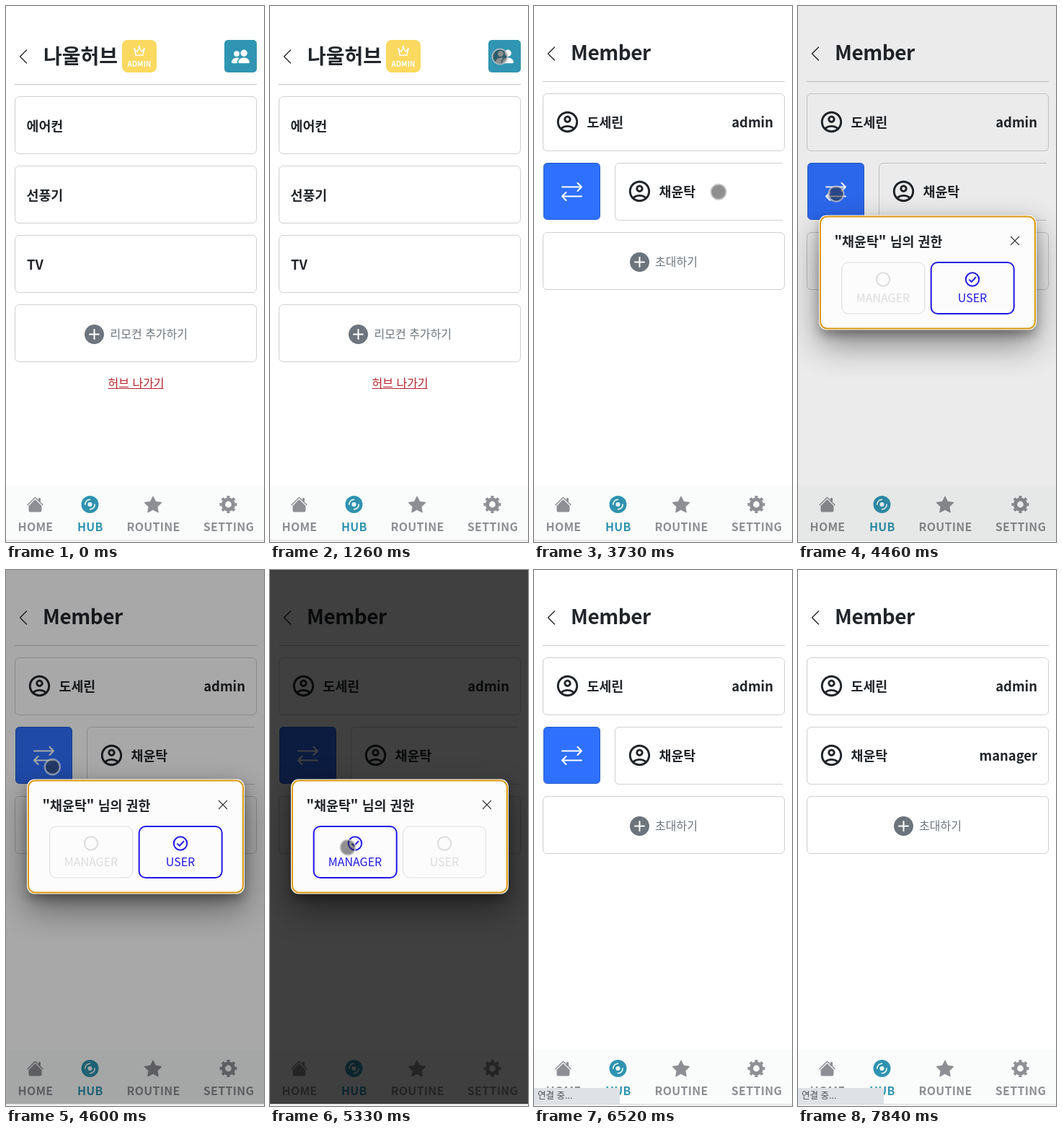
Recreate the animation shown at these times as an HTML page. Size 358 by 742 pixels, loop 8 s.

```html
<!DOCTYPE html>
<html lang="ko">
<head>
<meta charset="utf-8">
<title>Hub members</title>
<style>
  html, body { margin: 0; width: 100%; height: 100%; overflow: hidden; background: #fff; }
  svg { display: block; width: 100vw; height: 100vh; }
  text { font: 16px "Noto Sans CJK KR", "Noto Sans KR", "Noto Sans CJK JP", sans-serif; fill: currentColor; }
  svg { color: #212529; }
  .title { font-size: 28px; font-weight: 700; }
  .latin { letter-spacing: -.5px; }
  .name { font-size: 18.4px; font-weight: 700; }
  .end { text-anchor: end; }
  .mid { text-anchor: middle; }
  .muted { color: #6c757d; }
  .line { fill: none; stroke: currentColor; }
  .card { fill: #fff; stroke: #d0d0d0; }
  .rule { stroke: #c8c8c8; }
  .nav { color: #8e8f94; }
  .nav text { font-weight: 700; letter-spacing: .25px; }
  .nav .active { color: #2f93b0; }
  .on { color: #2018e4; stroke-width: 2; }
  .off { color: #dcdcdc; stroke-width: 1; }
  .wide { filter: blur(24px); }
  .tight { filter: blur(8px); }

  /* switches: hard on/off over one 8 s loop */
  .hub, .members, .status, .slid, .user, .manager, .modal, .before, .after, .touch {
    animation: 8s step-end infinite;
  }
  .hub { animation-name: hub; }
  .members { animation-name: members; }
  .status { animation-name: status; }
  .slid { animation-name: slid; }
  .user { animation-name: user; }
  .manager { animation-name: manager; }
  .modal { animation-name: modal; }
  .before { animation-name: before; }
  .after { animation-name: after; }
  .touch { animation-name: touch; }
  @keyframes hub { 0% { opacity: 1 } 25%, 100% { opacity: 0 } }
  @keyframes members { 0% { opacity: 0 } 25%, 100% { opacity: 1 } }
  @keyframes status { 0% { opacity: 0 } 24.125% { opacity: 1 } 26.625% { opacity: 0 } 80.625%, 100% { opacity: 1 } }
  @keyframes slid { 0% { opacity: 0 } 40% { opacity: 1 } 96.375%, 100% { opacity: 0 } }
  @keyframes user { 0% { opacity: 1 } 96.375%, 100% { opacity: 0 } }
  @keyframes manager { 0% { opacity: 0 } 96.375%, 100% { opacity: 1 } }
  @keyframes modal { 0% { opacity: 0 } 55.25% { opacity: 1 } 78.125%, 100% { opacity: 0 } }
  @keyframes before { 0% { opacity: 1 } 66.6%, 100% { opacity: 0 } }
  @keyframes after { 0% { opacity: 0 } 66.6%, 100% { opacity: 1 } }
  @keyframes touch { 0% { opacity: 0 } 2.5% { opacity: 1 } 78.125%, 100% { opacity: 0 } }

  .row { animation: slide 8s linear infinite; }
  @keyframes slide {
    0%, 40% { transform: translateX(0); animation-timing-function: ease-in-out; }
    45%, 96.37% { transform: translateX(100px); }
    96.375%, 100% { transform: translateX(0); }
  }
  .shade { animation: shade 8s linear infinite; }
  @keyframes shade {
    0%, 55.25% { opacity: 0; }
    60.25%, 78.125% { opacity: .75; }
    81.25%, 100% { opacity: 0; }
  }
  .dot { animation: move 8s ease-in-out infinite; }
  @keyframes move {
    0%, 2.5% { transform: translate(340px, 605px); }
    10.75%, 15% { transform: translate(327.5px, 73.5px); animation-timing-function: linear; }
    15.75% { transform: translate(319px, 70px); animation-timing-function: ease-out; }
    18.75%, 29.875% { transform: translate(313px, 67px); animation-timing-function: ease-in; }
    35.625% { transform: translate(285.5px, 229.5px); animation-timing-function: ease-out; }
    39.125%, 40% { transform: translate(175px, 257px); }
    45% { transform: translate(278px, 257px); }
    52.5%, 56.5% { transform: translate(53px, 260px); }
    60.75%, 61.625% { transform: translate(150px, 367px); }
    64.875%, 67.5% { transform: translate(108px, 384px); }
    76.5%, 100% { transform: translate(297px, 323px); }
  }
</style>
</head>
<body>
<svg viewBox="0 0 358 742">
  <defs>
    <rect id="card" x="12.5" y=".5" width="335" height="79" rx="5.5"/>
    <path id="back" class="line" stroke-width="1.4" stroke-linecap="round" stroke-linejoin="round" d="M28.5-9 19.5 0l9 9"/>
    <g id="plus">
      <circle r="13.5" fill="currentColor"/>
      <path d="M-6.5 0h13M0-6.5v13" stroke="#fff" stroke-width="2" stroke-linecap="round"/>
    </g>
    <path id="person" fill="currentColor" transform="scale(1.47) translate(-12 -12)" d="M12 2C6.48 2 2 6.48 2 12s4.48 10 10 10 10-4.48 10-10S17.52 2 12 2zM7.35 18.5C8.66 17.56 10.26 17 12 17s3.34.56 4.65 1.5c-1.31.94-2.91 1.5-4.65 1.5s-3.34-.56-4.65-1.5zm10.79-1.38C16.45 15.8 14.32 15 12 15s-4.45.8-6.14 2.12C4.7 15.73 4 13.95 4 12c0-4.42 3.58-8 8-8s8 3.58 8 8c0 1.95-.7 3.73-1.86 5.12zM12 6c-1.93 0-3.5 1.57-3.5 3.5S10.07 13 12 13s3.5-1.57 3.5-3.5S13.93 6 12 6zm0 5c-.83 0-1.5-.67-1.5-1.5S11.17 8 12 8s1.5.67 1.5 1.5S12.83 11 12 11z"/>
    <g id="option" class="line">
      <rect x="-57.3" y="355" width="115" height="71" rx="9"/>
      <circle cy="378.5" r="9.2" stroke-width="2"/>
    </g>
    <path id="tick" class="line" stroke-width="2" d="M-4.6 378.6l3.4 3.3 6.2-6.8"/>
  </defs>

  <rect width="358" height="742" fill="#fff"/>

  <g class="hub">
    <use href="#back" y="70"/>
    <text class="title" x="52" y="80">나울허브</text>
    <rect x="161" y="47" width="48" height="45" rx="8" fill="#fbd960"/>
    <g fill="#fff">
      <path fill="none" stroke="#fff" stroke-width="1.4" stroke-linejoin="round" d="M178.5 60l3.5 3.5 3-6.5 3 6.5 3.500-3.500-1.500 8h-10z"/>
      <circle cx="178.300" cy="59" r="1.300"/><circle cx="185" cy="56.300" r="1.400"/><circle cx="191.700" cy="59" r="1.300"/>
    </g>
    <text class="mid" x="185" y="84" style="font-size:10px;font-weight:700;fill:#fff">ADMIN</text>
    <rect x="303" y="47" width="45" height="45" rx="5" fill="#3095b2"/>
    <path fill="#fff" transform="translate(313 57.500) scale(1.560)" d="M7 14s-1 0-1-1 1-4 5-4 5 3 5 4-1 1-1 1H7Zm4-6a3 3 0 1 0 0-6 3 3 0 0 0 0 6Zm-5.784 6A2.238 2.238 0 0 1 5 13c0-1.355.68-2.75 1.936-3.72A6.325 6.325 0 0 0 5 9c-4 0-5 3-5 4s1 1 1 1h4.216ZM4.5 8a2.5 2.5 0 1 0 0-5 2.5 2.5 0 0 0 0 5Z"/>
    <path class="rule" d="M12 108.5h336"/>
    <g class="card">
      <use href="#card" y="125"/><use href="#card" y="221"/>
      <use href="#card" y="317"/><use href="#card" y="413"/>
    </g>
    <text class="name" x="28.500" y="173">에어컨</text>
    <text class="name" x="28.500" y="269">선풍기</text>
    <text class="name" x="29" y="365">TV</text>
    <g class="muted">
      <use href="#plus" x="122.500" y="454.500"/>
      <text x="144.500" y="460">리모컨 추가하기</text>
    </g>
    <text x="141.500" y="528" style="fill:#b5242c">허브 나가기</text>
    <path d="M141.500 529.500h77" stroke="#b5242c"/>
  </g>

  <g class="members">
    <use href="#back" y="66"/>
    <text class="title latin" x="51" y="75">Member</text>
    <path class="rule" d="M12 104.500h336"/>
    <use class="card" href="#card" y="121"/>
    <use href="#person" x="46.500" y="160.500"/>
    <text class="name" x="73.500" y="168">도세린</text>
    <text class="name end" x="332" y="168">admin</text>

    <g class="slid">
      <rect x="13.500" y="217.500" width="78" height="78" rx="5" fill="#2f70ff" stroke="#2560cf"/>
      <path fill="none" stroke="#fff" stroke-width="2.100" stroke-linecap="round" stroke-linejoin="round" d="M39 250.500h27m-5.500-5.500 5.500 5.500-5.500 5.500M66 263.500H39m5.500-5.500-5.500 5.500 5.500 5.500"/>
    </g>
    <g class="row">
      <rect class="slid" x="-8" y="217" width="26" height="80" fill="#fff"/>
      <use class="card" href="#card" y="217"/>
      <use href="#person" x="46.500" y="256.500"/>
      <text class="name" x="73.500" y="264">채윤탁</text>
      <text class="name end user" x="332" y="264">user</text>
      <text class="name end manager" x="332" y="264">manager</text>
    </g>
    <rect class="slid" x="345" y="216" width="13" height="82" fill="#fff"/>

    <use class="card" href="#card" y="313"/>
    <g class="muted">
      <use href="#plus" x="146.500" y="354.500"/>
      <text x="168" y="360">초대하기</text>
    </g>
  </g>

  <g class="nav">
    <rect y="664" width="358" height="75" fill="#fafcfb"/>
    <g fill="currentColor">
      <path transform="translate(28.500 678) scale(1.500)" d="M8.707 1.5a1 1 0 0 0-1.414 0L.646 8.146a.5.5 0 0 0 .708.708L8 2.207l6.646 6.647a.5.5 0 0 0 .708-.708L13 5.793V2.5a.5.5 0 0 0-.5-.5h-1a.5.5 0 0 0-.5.5v1.293ZM8 3.293l6 6V13.500a1.500 1.500 0 0 1-1.500 1.500h-9A1.500 1.500 0 0 1 2 13.500V9.293Z"/>
      <path transform="translate(192 678) scale(1.500)" d="M3.612 15.443c-.386.198-.824-.149-.746-.592l.83-4.73L.173 6.765c-.329-.314-.158-.888.283-.95l4.898-.696L7.538.792c.197-.39.73-.39.927 0l2.184 4.327 4.898.696c.441.062.612.636.282.95l-3.522 3.356.83 4.73c.078.443-.36.79-.746.592L8 13.187z"/>
    </g>
    <g class="line">
      <circle cx="308.500" cy="690" r="7" stroke-width="5.200"/>
      <circle cx="308.500" cy="690" r="10.200" stroke-width="3.600" pathLength="16" stroke-dasharray="1 1" stroke-dashoffset=".5"/>
    </g>
    <text class="mid" x="41" y="727">HOME</text>
    <text class="mid" x="204.500" y="727">ROUTINE</text>
    <text class="mid" x="309" y="727">SETTING</text>
    <g class="active">
      <circle cx="116.500" cy="690" r="12" fill="currentColor"/>
      <circle cx="116.500" cy="690" r="3" fill="#fafcfb"/>
      <path fill="none" stroke="#fafcfb" stroke-width="1.600" stroke-linecap="round" d="M109.800 690a6.700 6.700 0 0 1 6.700-6.700M123.200 690a6.700 6.700 0 0 1-6.700 6.700"/>
      <text class="mid" x="116.800" y="727">HUB</text>
    </g>
  </g>

  <rect class="shade" width="358" height="739"/>

  <g class="modal">
    <rect class="wide" x="30" y="310" width="300" height="158" opacity=".45"/>
    <rect class="tight" x="32" y="298" width="296" height="156" opacity=".35"/>
    <rect x="29" y="289.500" width="302" height="159" rx="11" fill="#fcfcfc"/>
    <rect x="31" y="291.500" width="298" height="155" rx="9.500" fill="none" stroke="#dc980f" stroke-width="2"/>
    <text class="name" x="50.500" y="333">"채윤탁" 님의 권한</text>
    <path d="M295 319l12 12m0-12-12 12" stroke="#333" stroke-width="1.100"/>
    <g class="before">
      <g class="off" transform="translate(118 0)"><use href="#option"/><text class="mid" y="410">MANAGER</text></g>
      <g class="on" transform="translate(242 0)"><use href="#option"/><use href="#tick"/><text class="mid" y="410">USER</text></g>
    </g>
    <g class="after">
      <g class="on" transform="translate(118 0)"><use href="#option"/><use href="#tick"/><text class="mid" y="410">MANAGER</text></g>
      <g class="off" transform="translate(242 0)"><use href="#option"/><text class="mid" y="410">USER</text></g>
    </g>
  </g>

  <g class="status">
    <path d="M0 717h116a3 3 0 0 1 3 3v19H0z" fill="#dee1e6"/>
    <text x="5" y="732" style="font-size:12.500px;fill:#4f5256">연결 중...</text>
  </g>

  <rect y="739" width="358" height="3" fill="#f4f4f4"/>
  <rect y="739" width="358" height="1" fill="#dadada"/>

  <g class="touch">
    <g class="dot">
      <circle r="10.500" fill="#282828" fill-opacity=".52"/>
      <circle r="10.500" fill="none" stroke="#c4c4c4" stroke-opacity=".75" stroke-width="2"/>
    </g>
  </g>
</svg>
</body>
</html>
```
